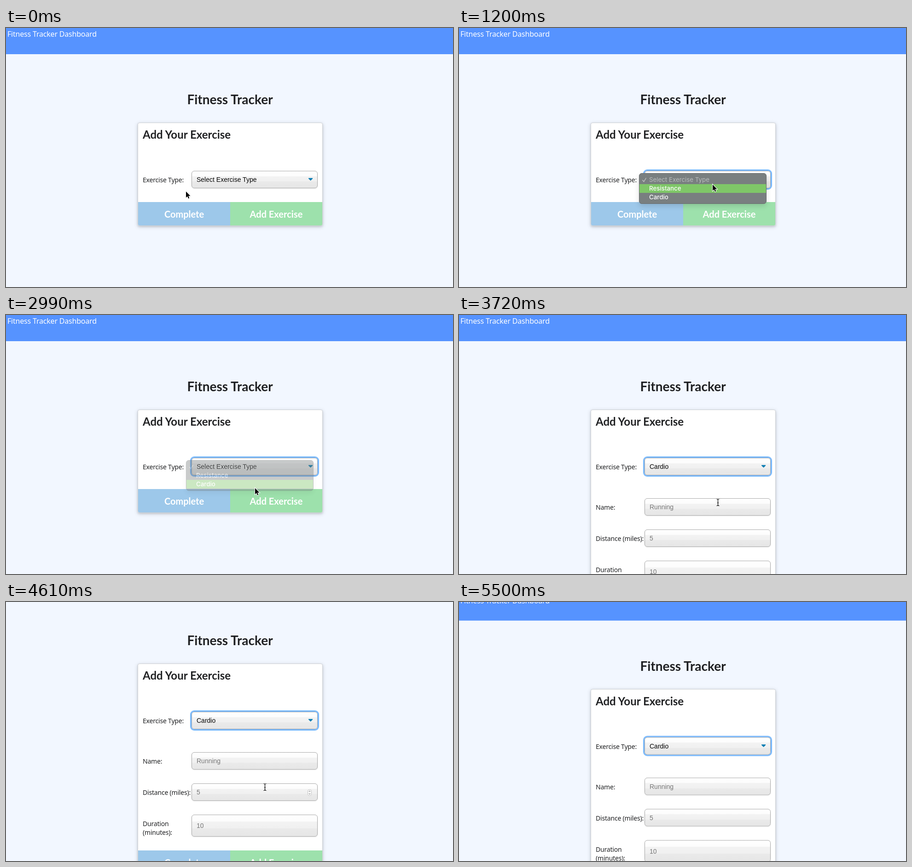
Animation of 971x564 px, one loop 6.1 s. Source, as an HTML page:

```html
<!DOCTYPE html>
<html lang="en">
<head>
<meta charset="utf-8">
<title>Fitness Tracker Dashboard</title>
<style>
  * { box-sizing: border-box; }
  html, body { margin: 0; width: 100%; height: 100%; overflow: hidden; background: #f2f7ff; }
  #stage { position: relative; width: 971px; height: 564px; overflow: hidden; }
  #stage div, #stage svg, h1, h2 { position: absolute; margin: 0; white-space: nowrap; }
  #page { inset: 0; }
  header {
    height: 57px; padding: 3px; background: #5693ff; color: #fff;
    font: 16px/20px "Noto Sans", sans-serif; letter-spacing: -.2px;
  }
  h1, h2, .btn { font-family: Lato, sans-serif; font-weight: 700; color: #1f2022; }
  h1 { top: 137px; left: 1px; width: 971px; text-align: center; font-size: 28px; line-height: 36px; }
  h2 { left: 10px; top: 10px; font-size: 24px; line-height: 30px; }
  #card {
    left: 286px; top: 206px; width: 402px; height: 225px;
    background: #fff; border: 1px solid #cfd2d6; border-radius: 4px;
    box-shadow: 0 2px 4px rgba(34, 36, 38, .14), 0 2px 10px rgba(34, 36, 38, .15);
  }
  #card.open { height: 459px; }
  .label { left: 10px; font: 14px/19px "Noto Sans", sans-serif; letter-spacing: -.2px; color: #1f2022; }
  .field {
    left: 116px; width: 274px; height: 38px; padding-left: 10px;
    border: 1px solid #aaa; border-radius: 6px; color: #757575;
    font: 14px/36px "Liberation Sans", Arial, sans-serif;
    background: linear-gradient(#fff, #fcfcfc 30%, #f3f3f3 30%, #f0f0f0 62%, #eaeaea 62%, #e6e6e6);
    box-shadow: 0 1px 0 1px rgba(0, 0, 0, .04);
  }
  .tall { height: 48px; line-height: 46px; }
  #type { color: #000; }
  #type.hover { border-color: #888; }
  #type.focus { box-shadow: 0 0 1px 3px rgba(59, 153, 252, .7); }
  #type svg { left: 252px; top: 14px; }
  #spin { left: 251px; top: 12px; }
  #extra, #spin, #menu { visibility: hidden; }
  #card.open #extra, #spin.on, #menu.on { visibility: visible; }
  .btn {
    bottom: 0; width: 200px; height: 51px; text-align: center; color: #fff;
    font-size: 20px; line-height: 53px;
  }
  .done { left: 0; background: #9dc8ea; border-radius: 0 0 0 3px; }
  .add { left: 200px; background: #9de1ac; border-radius: 0 0 3px; }
  #menu {
    left: 391px; top: 316px; width: 277px; height: 67px;
    background: #797f80; border: 1px solid #666b6c; border-radius: 6px;
    box-shadow: 0 5px 12px rgba(0, 0, 0, .13);
    font: 500 13.3px/19px Inter, sans-serif; color: #fff;
  }
  .item { left: 0; width: 275px; height: 19px; padding-left: 21px; }
  .item.lit { background: #7fc768; }
  .off { color: #b9bdbd; font-weight: 400; }
  #menu svg { left: 5px; top: 8px; }
  #pointer, #beam { left: 0; top: 0; overflow: visible; }
</style>
</head>
<body>
<div id="stage">
  <div id="page">
    <header>Fitness Tracker Dashboard</header>
    <h1>Fitness Tracker</h1>
    <div id="card">
      <h2>Add Your Exercise</h2>
      <div class="label" style="top:114px">Exercise Type:</div>
      <div class="field" id="type" style="top:104px">
        <span id="choice"></span>
        <svg width="12" height="9"><path d="M1.6 1.5h8L5.6 5.5z" fill="#007cb2" stroke="#007cb2" stroke-width="1.4" stroke-linejoin="round"/></svg>
      </div>
      <div id="extra" style="left:0;top:0">
        <div class="label" style="top:202px">Name:</div>
        <div class="field" style="top:192px">Running</div>
        <div class="label" style="top:270px">Distance (miles):</div>
        <div class="field" style="top:260px">5
          <svg id="spin" width="9" height="14" fill="none">
            <rect x=".5" y=".5" width="8" height="13" rx="3.5" fill="#fff" stroke="#c4c4c4"/>
            <path d="M2.7 5.2l1.8-2 1.8 2M2.7 8.8l1.8 2 1.8-2" stroke="#555"/>
          </svg>
        </div>
        <div class="label" style="top:338px">Duration<br>(minutes):</div>
        <div class="field tall" style="top:328px">10</div>
      </div>
      <div class="btn done">Complete</div>
      <div class="btn add">Add Exercise</div>
    </div>
  </div>
  <div id="menu">
    <svg width="11" height="11" fill="none"><path d="M1.5 6l3 3.5L9.5 1.5" stroke="#c3c6c6" stroke-width="1.4"/></svg>
    <div class="item off" style="top:4px">Select Exercise Type</div>
    <div class="item" id="resistance" style="top:23px">Resistance</div>
    <div class="item" id="cardio" style="top:42px">Cardio</div>
  </div>
  <svg id="pointer" width="12" height="18"><path d="M0 0v13.5l3.1-3 2.1 5 2-.9-2-4.8h4.3z" stroke="#fff" stroke-width="2" paint-order="stroke"/></svg>
  <svg id="beam" width="8" height="16" fill="none">
    <g id="ibeam"><path d="M-3-7.5Q0-7.5 0-5.5Q0-7.5 3-7.5M0-6V6M-3 7.5Q0 7.5 0 5.5Q0 7.5 3 7.5M-1.5 1h3" stroke="#fff" stroke-width="3"/>
    <path d="M-3-7.5Q0-7.5 0-5.5Q0-7.5 3-7.5M0-6V6M-3 7.5Q0 7.5 0 5.5Q0 7.5 3 7.5M-1.5 1h3" stroke="#000" stroke-width="1.2"/></g>
  </svg>
</div>
<script>
  const LOOP = 6100;
  // The picture only changes at these moments.
  const ticks = [0, 150, 300, 450, 600, 750, 900, 1050, 1200, 1500, 1650, 1790, 1940, 2390,
    2990, 3130, 3570, 3720, 3870, 4020, 4460, 4610, 4760, 4910, 5060, 5200, 5350, 5500];
  // [time, x, y] of the cursor and [time, offset] of the scroll
  const path = [[0, 391, 356], [300, 440, 414], [900, 545, 345], [1050, 551, 341], [1350, 551, 341],
    [1940, 543, 379], [2390, 541, 377], [3420, 541, 377], [3720, 562, 408], [4020, 562, 407],
    [4310, 562, 407], [4610, 562, 403], [4910, 562, 403], [5500, 980, 600]];
  const scroll = [[0, 0], [3720, 0], [4020, 80], [4310, 80], [4610, 72], [4910, 50], [5200, 28], [5500, 16.5]];

  const $ = id => document.getElementById(id);
  const toggle = (id, name, on) => $(id).classList.toggle(name, on);
  const move = (id, x, y) => { $(id).style.transform = `translate(${x}px, ${y}px)`; };

  function at(keys, t) {
    const i = keys.findIndex(k => k[0] > t);
    if (i < 0) return keys[keys.length - 1].slice(1);
    const [a, b] = [keys[i - 1], keys[i]];
    const p = (t - a[0]) / (b[0] - a[0]);
    return a.slice(1).map((v, j) => v + (b[j + 1] - v) * p);
  }

  function draw(t) {
    const [x, y] = at(path, t).map(Math.round);
    const during = (from, to) => t >= from && t < to;
    const chosen = t >= 3130;
    const beam = during(3720, 5060);

    move('page', 0, -at(scroll, t)[0]);
    toggle('card', 'open', chosen);
    $('choice').textContent = chosen ? 'Cardio' : 'Select Exercise Type';
    toggle('type', 'hover', t < 1200 && x > 403 && y < 349);
    toggle('type', 'focus', t >= 1200);
    toggle('spin', 'on', during(4460, 4910));

    toggle('menu', 'on', during(1200, 3130));
    $('menu').style.opacity = t < 2990 ? 1 : .4;
    toggle('resistance', 'lit', y >= 340 && y < 359);
    toggle('cardio', 'lit', y >= 359 && y < 378);

    move('pointer', x, y);
    move('beam', x + .5, y);
    $('pointer').style.visibility = beam ? 'hidden' : 'visible';
    $('beam').style.visibility = beam ? 'visible' : 'hidden';
  }

  const start = performance.now();
  function frame() {
    const t = (performance.now() - start) % LOOP;
    draw(ticks.filter(k => k <= t).pop());
    requestAnimationFrame(frame);
  }
  frame();
</script>
</body>
</html>
```
